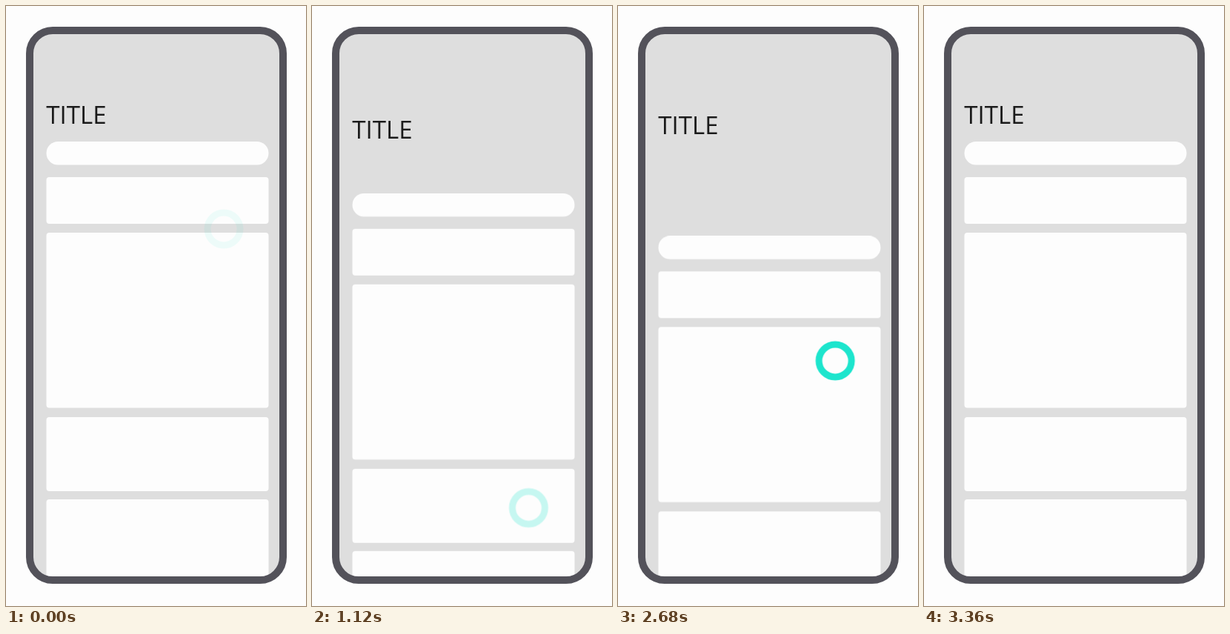
An HTML page that plays this animation: 405 by 810 pixels, repeating every 5080 ms.

```html
<!DOCTYPE html>
<html lang="en">
<head>
<meta charset="utf-8">
<title>Pull to stretch</title>
<style>
  html, body { margin: 0; width: 100%; height: 100%; overflow: hidden; background: #fdfdfd; }
  svg { display: block; width: 405px; height: 810px; }
  text { font: 33px "Open Sans", sans-serif; fill: #1a1a1a; }
  #list { fill: #fdfdfd; }
  #ring { fill: none; stroke: #1de5cd; stroke-width: 9; }
</style>
</head>
<body>
<svg viewBox="0 0 405 810">
  <clipPath id="screen"><rect x="36" y="37" width="334" height="734" rx="27"/></clipPath>
  <rect x="32" y="33" width="342" height="742" rx="31" fill="#dedede"/>
  <g clip-path="url(#screen)">
    <text id="title" x="54.3" y="158.5">TITLE</text>
    <g id="list">
      <rect x="54.5" y="183" width="300" height="31.5" rx="15.75"/>
      <rect x="54.5" y="231" width="300" height="63" rx="4"/>
      <rect x="54.5" y="306" width="300" height="236.5" rx="4"/>
      <rect x="54.5" y="555" width="300" height="100" rx="4"/>
      <rect x="54.5" y="666" width="300" height="140" rx="4"/>
    </g>
  </g>
  <rect x="32" y="33" width="342" height="742" rx="31" fill="none" stroke="#53525a" stroke-width="10"/>
  <circle id="ring" r="22"/>
</svg>
<script>
const LOOP = 5080, TICK = 40;
const PULL = 'cubic-bezier(.42,0,.58,1)';
const BACK = 'cubic-bezier(.3,0,.37,1)';
const DRAG = 'cubic-bezier(.58,.2,.8,1)';

// Each step: time, value, easing towards the next step
function track(id, steps, toStyle) {
  const frames = steps.map(([t, v, easing = 'linear']) =>
    ({ offset: t / LOOP, easing, ...toStyle(v) }));
  const anim = document.getElementById(id).animate(frames, { duration: LOOP, fill: 'both' });
  anim.pause();
  return anim;
}

const down = y => ({ transform: `translate(0px, ${y}px)` });
const at = ([x, y]) => ({ transform: `translate(${x}px, ${y}px)` });
const fade = opacity => ({ opacity });

const tracks = [
  track('list', [
    [0, 0], [450, 0, PULL], [920, 190, BACK], [1362, 0],
    [2390, 0, PULL], [2867, 187, BACK], [3320, 0], [LOOP, 0]
  ], down),
  track('title', [
    [0, 0], [510, 0, PULL], [960, 29.5], [1030, 29.5, BACK], [1366, 0],
    [2450, 0, PULL], [2920, 29.5], [2977, 29.5, BACK], [3362, 0], [LOOP, 0]
  ], down),
  track('ring', [
    [0, [294, 301]], [380, [294, 301], DRAG], [980, [292.4, 677.5]],
    [2358, [292.4, 677.5]], [2359, [294, 313], DRAG], [2959, [292.2, 703]],
    [LOOP - 1, [292.2, 703]], [LOOP, [294, 301]]
  ], at),
  track('ring', [
    [0, .07], [380, .07], [580, 1], [920, 1], [1185, 0],
    [2358, 0], [2359, .15], [2530, 1], [2867, 1], [3132, 0],
    [LOOP - 1, 0], [LOOP, .07]
  ], fade)
];

const start = performance.now();
function draw() {
  const t = (performance.now() - start) % LOOP;
  const now = Math.floor(t / TICK) * TICK;
  for (const anim of tracks) anim.currentTime = now;
  requestAnimationFrame(draw);
}
draw();
</script>
</body>
</html>
```
